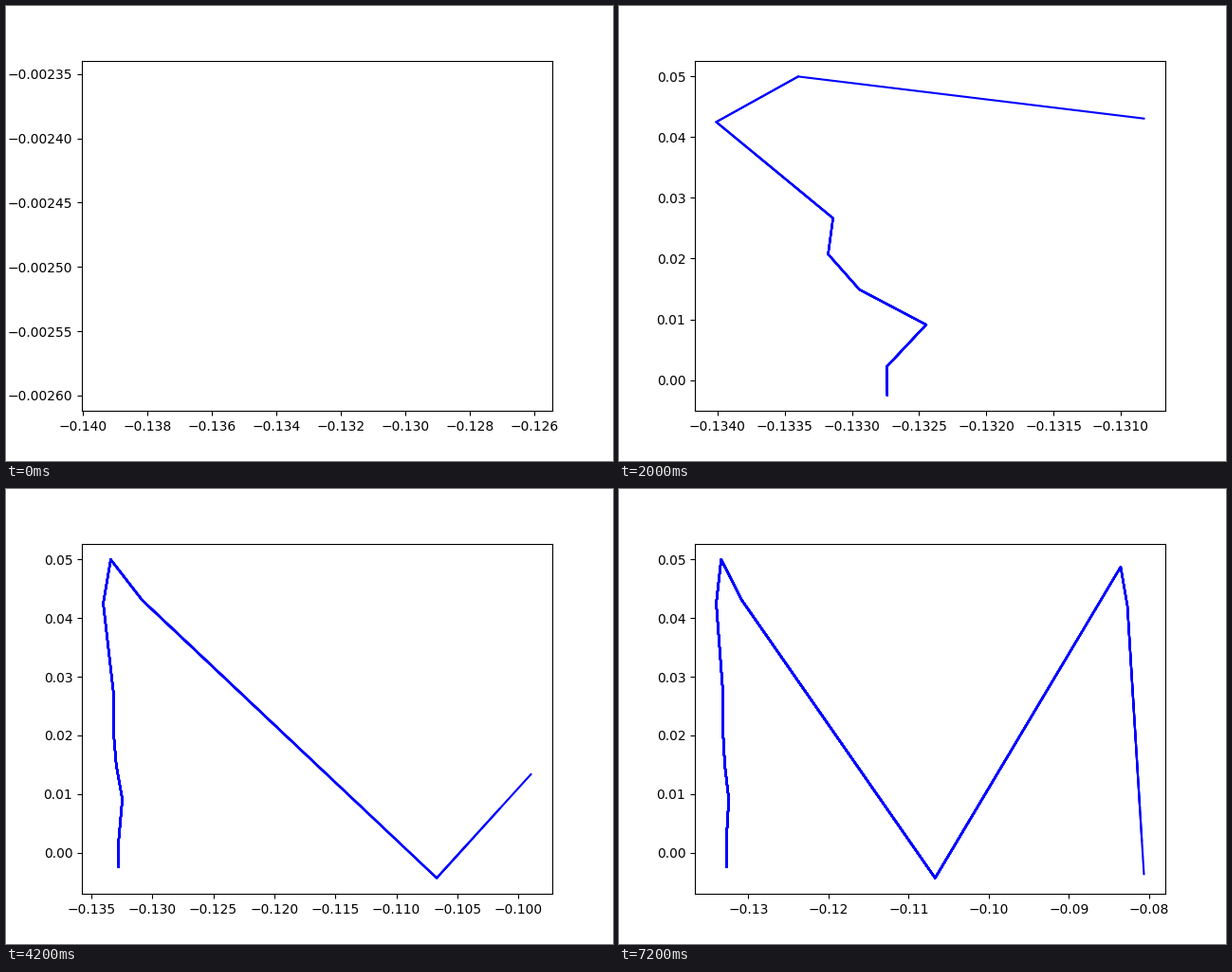
These frames come from a looping animation (640 px wide and 480 px high, 7.4 s). A matplotlib script:

```python
import matplotlib.pyplot as plt
import numpy as np
from matplotlib.animation import FuncAnimation

STEP_MS = 200
STEPS = 37

# Key points (step, x, y) in thousandths: an M drawn in four nine-step strokes,
# with the wobbly start spelled out because the axes zoom in on it.
KEYS = [
    (0, -132.7369, -2.47577), (1, -132.7426, 2.155), (2, -132.4476, 9.11),
    (3, -132.9443, 14.9), (4, -133.1773, 20.73), (5, -133.141, 26.66),
    (8, -134.01, 42.51), (9, -133.4, 50), (10, -130.827, 43.08),
    (18, -106.7, -4.35), (27, -83.55, 48.75), (28, -82.71, 42.06),
    (36, -80.65, -3.67),
]

key_step, key_x, key_y = np.transpose(KEYS)
step_no = np.arange(STEPS)
x = np.interp(step_no, key_step, key_x) / 1000
y = np.interp(step_no, key_step, key_y) / 1000

fig, ax = plt.subplots(figsize=(6.4, 4.8), dpi=100)


def update(step):
    """Overlay every partial path up to this step; the axes rescale to fit."""
    ax.clear()
    for count in range(1, step + 2):
        ax.plot(x[:count], y[:count], color="b", lw=1.5)
    return ax.lines


anim = FuncAnimation(fig, update, frames=STEPS, interval=STEP_MS,
                     repeat=True, repeat_delay=0, blit=False)

plt.show()
```
